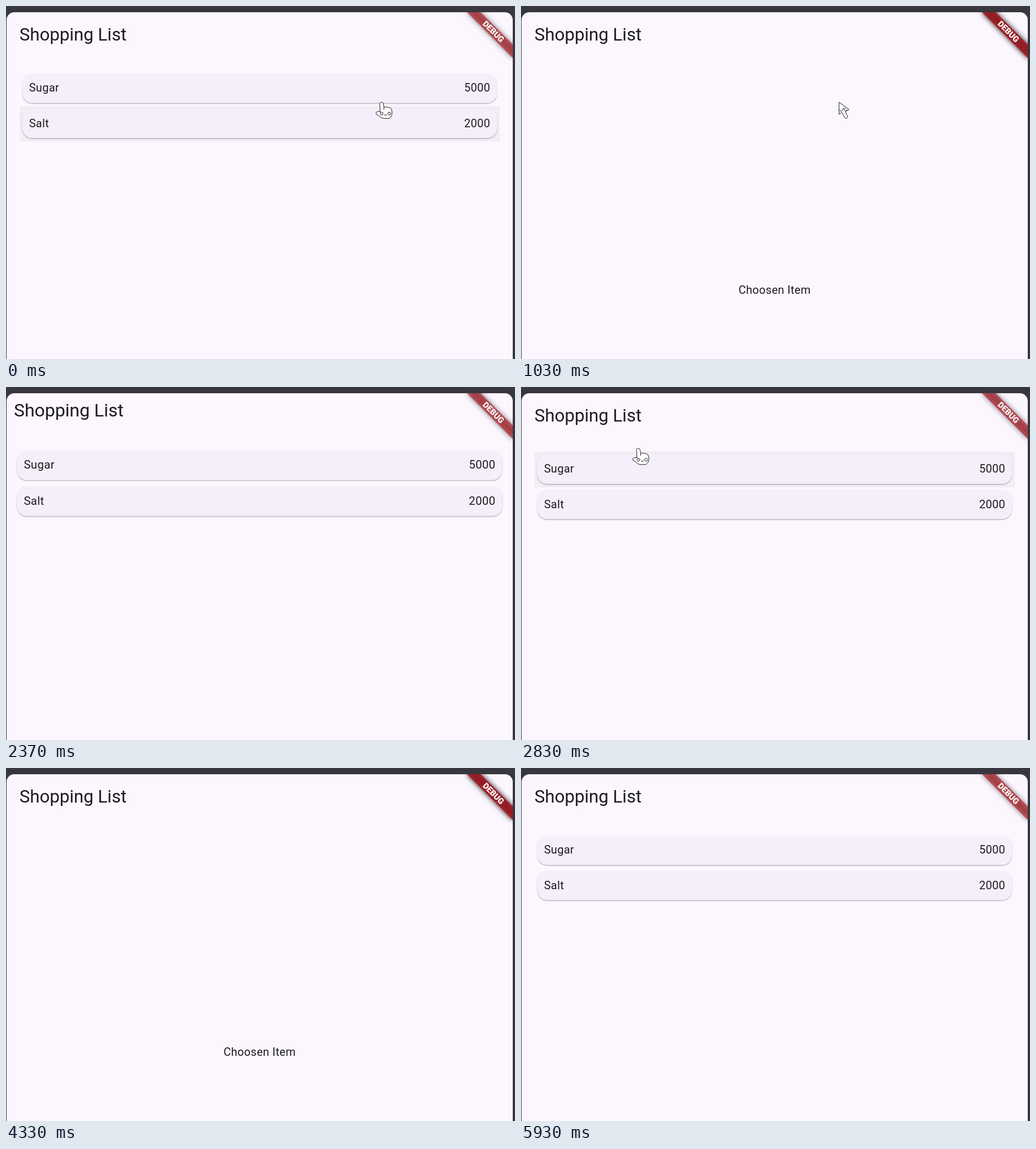
Animation of 899 by 623 pixels, one loop 5960 ms. Source, as an HTML page:

```html
<!DOCTYPE html>
<html lang="en">
<head>
<meta charset="utf-8">
<title>Shopping List</title>
<style>
  html, body { margin: 0; width: 100%; height: 100%; overflow: hidden; background: #38373f; }
  body { position: relative; font: 400 19.9px/28.4px Roboto, sans-serif; letter-spacing: .355px; color: #1d1b20; }
  .window, .page, .scrim, .row, .card, .banner, .cursor { position: absolute; box-sizing: border-box; }
  .window { left: 1px; top: 11px; width: 894px; height: 902px; border-radius: 14px; overflow: hidden; }
  .page { inset: 0; background: #fcf6fe; overflow: hidden; }
  .scrim { inset: 0; background: #000; }
  h1 { margin: 0; padding-left: 22.7px; height: 79.5px; font: 400 31.2px/79.5px Roboto, sans-serif; letter-spacing: 0; }
  .row { left: 22.7px; right: 22.7px; height: 62.4px; }
  .row.hover { background: rgba(0, 0, 0, .04); }
  .card { inset: 5.7px; padding: 11.3px; border-radius: 17px; background: #f4effa;
    display: flex; justify-content: space-between;
    box-shadow: 0 1.4px 1.6px rgba(0, 0, 0, .24), 0 .5px 3px rgba(0, 0, 0, .06); }
  .chosen { position: absolute; left: 0; right: 0; top: 476.8px; text-align: center; }
  .banner { left: 100%; top: 0; width: 113.6px; height: 17px; margin: 39.8px 0 0 -56.8px;
    transform-origin: 56.8px -39.8px; transform: rotate(45deg); }
  .banner::before { content: ""; position: absolute; inset: 0; background: rgba(0, 0, 0, .5); filter: blur(5px); }
  .banner span { position: absolute; inset: 0; background: rgba(183, 25, 34, .627); color: #fff;
    text-align: center; font: 900 14.5px/17px Roboto, sans-serif; letter-spacing: 0; }
  .cursor { left: 0; top: 0; overflow: visible; fill: #fff; stroke: #1c1c22; stroke-linejoin: round; }
  .cursor .mark { fill: none; }
</style>
</head>
<body>
<div class="window">
  <div class="page" id="list">
    <h1>Shopping List</h1>
    <div class="row" style="top:103.3px"><div class="card"><span>Sugar</span><span>5000</span></div></div>
    <div class="row" style="top:165.7px"><div class="card"><span>Salt</span><span>2000</span></div></div>
  </div>
  <div class="scrim" id="scrim"></div>
  <div class="page" id="detail">
    <h1>Shopping List</h1>
    <div class="chosen">Choosen Item</div>
    <div class="banner"><span>DEBUG</span></div>
  </div>
  <div class="banner"><span>DEBUG</span></div>
</div>
<svg class="cursor" id="cursor" width="40" height="40">
  <g id="arrow">
    <path d="M.5 0V21.5L5.5 18L11 28Q14 30 16 26.5L11.5 16.5L18 13Z"/>
    <path class="mark" d="M2 13q1 5 4 2q0-4 2.500-4q2 1 1 4M9 9l4 4M11 16l4-2"/>
  </g>
  <g id="hand">
    <path d="M-3 2Q-2 0 0 0Q3 0 3.500 3L4.500 9Q8 7 11 9Q15 9 17 11Q19 13 19 20Q18 26 14 28.500H3Q-1 28 -4 24L-9 21Q-11 18 -7 16.500L-2 16Z"/>
    <path class="mark" d="M4.500 9V13M-2 16V18"/>
    <circle class="mark" cx=".5" cy="20" r="2.500"/>
    <circle class="mark" cx="14" cy="20" r="2.500"/>
    <path class="mark" d="M5 22.500h5"/>
  </g>
</svg>
<script>
const LOOP = 5960, MOVE = 300;
const ROW_TOP = 114.3, ROW_HEIGHT = 62.4, HAND_HOTSPOT = 7;

// [time, page opens?]
const routes = [[600, true], [2275, false], [3097, true], [4660, false]];

// Pointer visits as [time, x, y] stops
const visits = [
  [[0, 663, 170], [150, 661, 150], [580, 655, 142], [780, 640, 150], [1030, 562, 170], [1350, 330, 90], [1680, 112, -30]],
  [[2520, 125, -30], [2750, 190, 90], [2980, 238, 142], [3110, 238, 140], [3270, 233, 37], [3360, 215, -30]],
  [[4860, 140, -30], [4930, 155, 2], [5150, 150, 10], [5600, 75, -30]]
];

const $ = id => document.getElementById(id);
const list = $('list'), detail = $('detail'), scrim = $('scrim'), cursor = $('cursor');
const rows = [...document.querySelectorAll('.row')];

const mix = (a, b, p) => a + (b - a) * p;
const ramp = (p, from, to) => Math.min(1, Math.max(0, (p - from) / (to - from)));

function cubic(x, x1, y1, x2, y2) {
  const at = (u, a, b) => 3 * a * u * (1 - u) ** 2 + 3 * b * u * u * (1 - u) + u ** 3;
  let lo = 0, hi = 1;
  for (let i = 0; i < 24; i++) {
    const mid = (lo + hi) / 2;
    if (at(mid, x1, x2) < x) lo = mid; else hi = mid;
  }
  return at((lo + hi) / 2, y1, y2);
}

// Slow start, then a quick zoom with a long settle
const zoom = p => p < 1 / 6
  ? .4 * cubic(p * 6, .05, 0, .133333, .06)
  : mix(.4, 1, cubic((p - 1 / 6) * 1.2, .208333, .82, .25, 1));

function drawPages(t) {
  const route = routes.filter(r => r[0] <= t).pop() || [-MOVE, false];
  const p = ramp(t, route[0], route[0] + MOVE), z = zoom(p), opens = route[1];
  const scale = (el, s) => el.style.transform = p < 1 ? `scale(${s})` : 'none';
  scale(list, opens ? mix(1, 1.05, z) : mix(1.1, 1, z));
  scale(detail, opens ? mix(.85, 1, z) : mix(1, .9, z));
  detail.style.opacity = opens ? ramp(p, .125, .25) : 1 - ramp(p, .0825, .2075);
  scrim.style.opacity = opens ? .6 * ramp(p, .2075, .4175) : 0;
  return opens;
}

function pointerAt(t) {
  const stops = visits.find(v => t >= v[0][0] && t < v[v.length - 1][0]);
  if (!stops) return null;
  const i = stops.findIndex(s => s[0] > t);
  const [t0, x0, y0] = stops[i - 1], [t1, x1, y1] = stops[i];
  const p = (t - t0) / (t1 - t0);
  return [mix(x0, x1, p), mix(y0, y1, p)];
}

function drawPointer(t, detailOpen) {
  const point = pointerAt(t);
  const row = point && !detailOpen ? Math.floor((point[1] + HAND_HOTSPOT - ROW_TOP) / ROW_HEIGHT) : -1;
  const overRow = row >= 0 && row < rows.length;
  rows.forEach((el, i) => el.classList.toggle('hover', i === row));
  cursor.style.display = point ? 'block' : 'none';
  if (!point) return;
  cursor.style.transform = `translate(${point[0]}px, ${point[1]}px)`;
  $('hand').style.display = overRow ? 'inline' : 'none';
  $('arrow').style.display = overRow ? 'none' : 'inline';
}

const start = performance.now();
function draw() {
  const t = (performance.now() - start) % LOOP;
  drawPointer(t, drawPages(t));
  requestAnimationFrame(draw);
}
draw();
</script>
</body>
</html>
```
